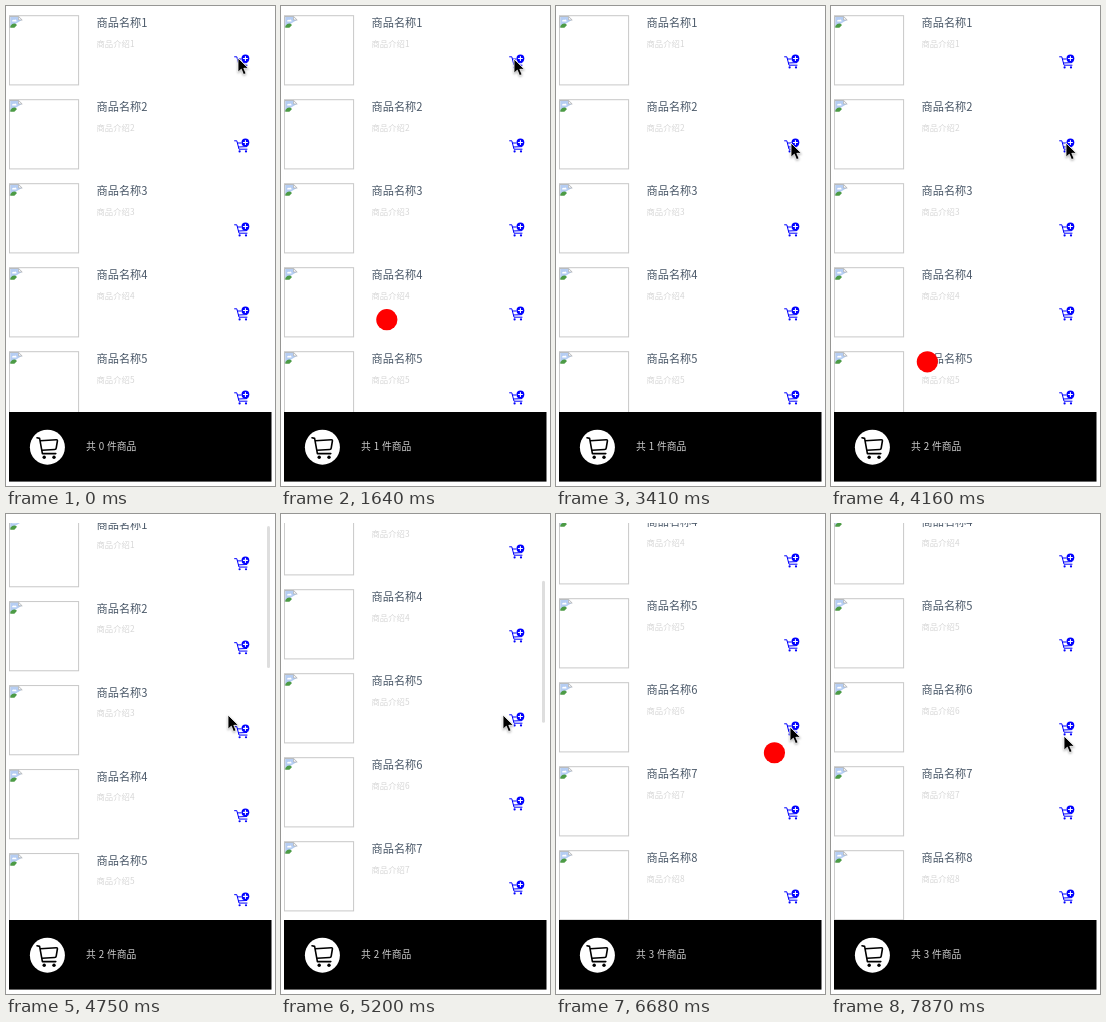
Animation, 269 px wide and 480 px high, one loop 8000 ms. Source, as an HTML page:

```html
<!DOCTYPE html>
<html lang="zh">
<head>
<meta charset="utf-8">
<title>购物车</title>
<style>
  html, body { margin: 0; width: 100%; height: 100%; overflow: hidden; background: #fff; }
  svg { display: block; width: 100%; height: 100%; }
  text { font-family: "Noto Sans CJK SC", "Noto Sans CJK", "Noto Sans CJK JP", sans-serif; font-weight: 300; white-space: pre; }
  .name { font-size: 11.2px; fill: #4a5868; }
  .intro { font-size: 8.4px; fill: #d6d6d6; }
  .total { font-size: 9.8px; word-spacing: .7px; fill: #d0d0d0; }
  #pointer { filter: drop-shadow(0 1px 1px rgba(0, 0, 0, .3)); }
</style>
</head>
<body>
<svg viewBox="0 0 269 480">
  <defs>
    <clipPath id="view"><rect x="3" y="9" width="263" height="397"/></clipPath>
    <g id="broken">
      <path d="M.5 11.8V.5H9.2L12.8 4" fill="#fff" stroke="#a9adb0" stroke-width=".8"/>
      <path d="M1 1H8.8V4H12.4L1 11Z" fill="#b5cdf3"/>
      <path d="M2.8 5.4a1.3 1.3 0 0 1 2-1.4a1.4 1.4 0 0 1 2.3 1.4Z" fill="#fff"/>
      <path d="M1 11.8V10Q4.2 5.8 7.6 9L5 11.8Z" fill="#4c9b45"/>
      <path d="M5.6 12.4L13 5.6V8L8.6 12.4Z" fill="#fff"/>
      <path d="M9.2 .5V4H12.8" fill="none" stroke="#a9adb0" stroke-width=".8"/>
    </g>
    <g id="add" fill="none" stroke="#00f" stroke-linecap="round" stroke-linejoin="round">
      <path d="M.6 2.4H2.8L5 10.8H13M3.5 4.6H7M4.4 8.6L13 8.2L13.5 7.6"/>
      <circle cx="5.6" cy="13" r="1.1" fill="#00f" stroke="none"/>
      <circle cx="12" cy="13" r="1.1" fill="#00f" stroke="none"/>
      <circle cx="11.4" cy="4.1" r="3.9" fill="#00f" stroke="none"/>
      <path d="M9.4 4.1H13.4M11.4 2.1V6.1" stroke="#fff" stroke-width="1.1"/>
    </g>
  </defs>
  <rect width="269" height="480" fill="#fff"/>
  <g clip-path="url(#view)">
    <g id="list"></g>
    <rect id="thumb" x="261" width="3" height="142" rx="1.5" fill="#dedede"/>
  </g>
  <rect x="3" y="406" width="262.5" height="69.6" fill="#000"/>
  <circle cx="41.4" cy="441.2" r="17.5" fill="#fff"/>
  <g fill="none" stroke="#000" stroke-width="1.6" stroke-linecap="round" stroke-linejoin="round">
    <path d="M31 431.8L33.6 432.4L36.4 447.6H49.8M34.3 434.8L50.4 433.8Q51.6 433.8 51.4 435L50.2 442.2Q50 443.4 48.8 443.5L36 444.3"/>
    <circle cx="38.2" cy="451.2" r="1.7" fill="#000" stroke="none"/>
    <circle cx="48" cy="451.2" r="1.7" fill="#000" stroke="none"/>
  </g>
  <text id="total" class="total" x="80" y="444.2"></text>
  <circle id="ball" r="10.6" fill="#f00"/>
  <path id="pointer" d="M0 0V14.2L3.3 11.2L5.5 16.6L8.1 15.5L5.8 10.3H10.4Z" fill="#000" stroke="#fff" stroke-width=".8" stroke-linejoin="round"/>
</svg>
<script>
const LOOP = 8000, TICK = 148.2, FLIGHT = 1000, ROW = 84;
const $ = id => document.getElementById(id);
const [list, thumb, total, ball, pointer] = ["list", "thumb", "total", "ball", "pointer"].map($);

// Each key is [time, ...values]
const pointerKeys = [
  [0, 232, 52], [1000, 232, 52], [1030, 233, 53], [2075, 233, 53], [2371, 233, 66],
  [3400, 235, 137], [4150, 235, 137], [4594, 222, 201], [5780, 222, 201],
  [6070, 234, 213], [7560, 234, 213], [7706, 233, 215], [7850, 233, 222]
];
const scrollKeys = [
  [4594, 0], [4742, 6], [4891, 55], [5039, 125], [5187, 186], [5335, 226], [5483, 249], [5632, 261]
];
const thumbKeys = [[4594, 0], [4740, 1], [5790, 1], [6070, 0]];
const clicks = [
  { at: 1240, y: 57 },
  { at: 3725, y: 57 + ROW },
  { at: 6565, y: 57 + 5 * ROW - 261 }
];

const lerp = (a, b, p) => a + (b - a) * p;

function track(keys, t) {
  const next = keys.findIndex(k => k[0] > t);
  if (next === 0) return keys[0].slice(1);
  if (next < 0) return keys[keys.length - 1].slice(1);
  const a = keys[next - 1], b = keys[next];
  const p = (t - a[0]) / (b[0] - a[0]);
  return a.slice(1).map((v, i) => lerp(v, b[i + 1], p));
}

// cubic-bezier(.25, .1, .25, 1)
function ease(x) {
  const curve = (u, a, b) => 3 * u * (1 - u) ** 2 * a + 3 * u * u * (1 - u) * b + u ** 3;
  let lo = 0, hi = 1;
  for (let i = 0; i < 24; i++) {
    const mid = (lo + hi) / 2;
    if (curve(mid, 0.25, 0.25) < x) lo = mid; else hi = mid;
  }
  return curve(lo, 0.1, 1);
}

function row(i) {
  return `<g transform="translate(0 ${i * ROW})">
    <rect x="3.4" y="9.7" width="69.2" height="69.2" fill="none" stroke="#c8c8c8"/>
    <use href="#broken" x="3.4" y="10"/>
    <text class="name" x="90.5" y="20.8">商品名称${i + 1}</text>
    <text class="intro" x="90.5" y="40.6">商品介绍${i + 1}</text>
    <use href="#add" x="228" y="48.4"/>
  </g>`;
}

function draw(t) {
  const [scroll] = track(scrollKeys, t);
  list.setAttribute("transform", `translate(0 ${-scroll})`);
  thumb.setAttribute("y", 10.2 + scroll * 0.3045);
  thumb.setAttribute("opacity", track(thumbKeys, t)[0]);
  pointer.setAttribute("transform", `translate(${track(pointerKeys, t).join(" ")})`);

  const done = clicks.filter(c => c.at <= t);
  total.textContent = `共 ${done.length} 件商品`;
  const last = done[done.length - 1];
  const flying = last && t - last.at < FLIGHT;
  ball.setAttribute("visibility", flying ? "visible" : "hidden");
  if (flying) {
    const p = ease((t - last.at) / FLIGHT);
    ball.setAttribute("cx", lerp(238.5, 40, p));
    ball.setAttribute("cy", lerp(last.y, 441, p));
  }
}

list.innerHTML = Array.from({ length: 10 }, (_, i) => row(i)).join("");

const start = performance.now();
function loop() {
  const t = (performance.now() - start) % LOOP;
  draw(Math.floor(t / TICK) * TICK);
  requestAnimationFrame(loop);
}
loop();
</script>
</body>
</html>
```
